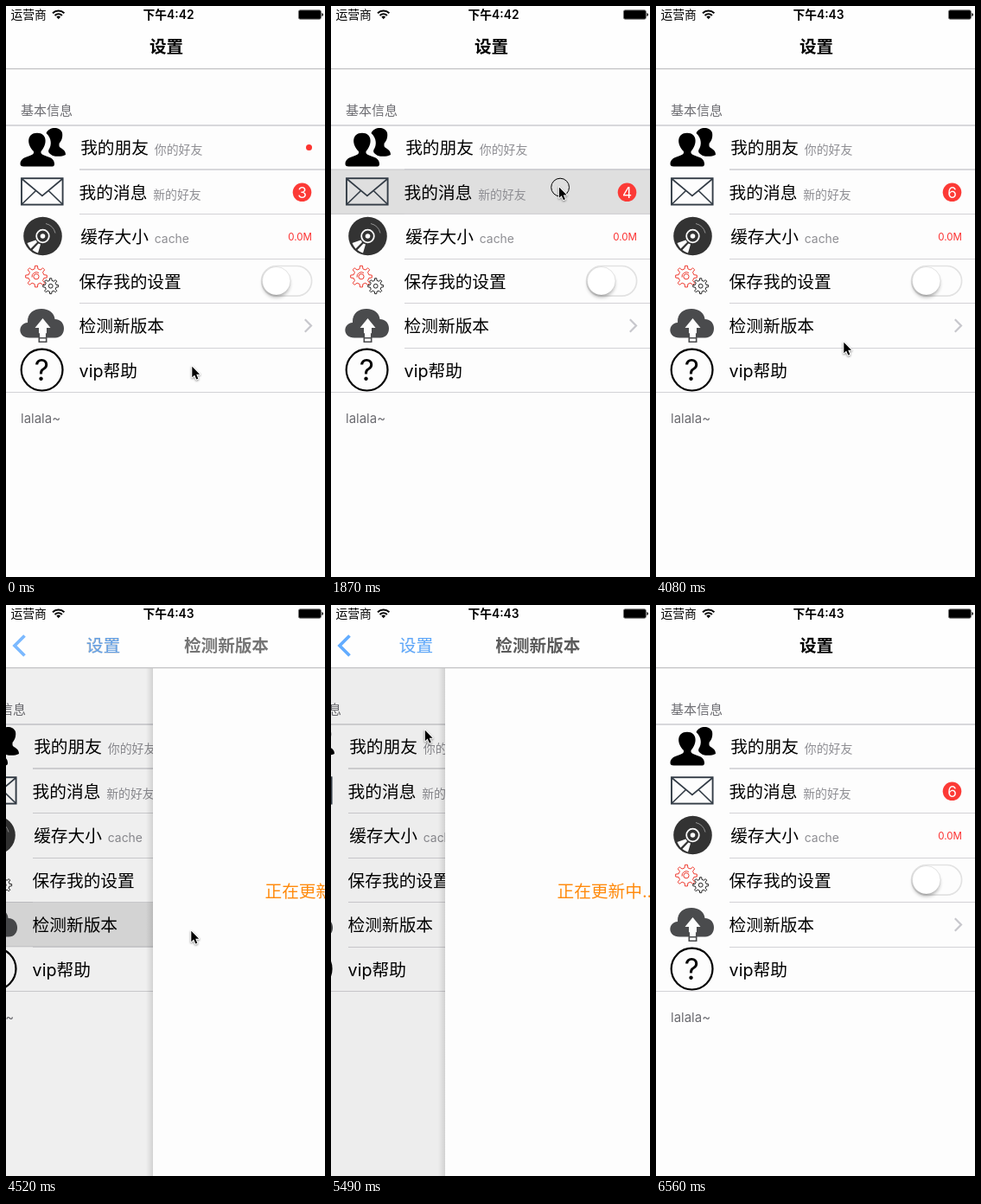
Animation of 369 by 660 pixels, one loop 7.04 s. Source, as an HTML page:

```html
<!DOCTYPE html>
<html lang="zh-CN">
<head>
<meta charset="utf-8">
<title>设置</title>
<style>
html, body { margin: 0; width: 100%; height: 100%; overflow: hidden; background: #fdfdfd; }
svg { display: block; font-family: Inter, "Noto Sans CJK SC", "Noto Sans CJK", sans-serif; }
.label { font-size: 19.7px; }
.detail { font-size: 13.9px; fill: #8e8e93; }
.head { font-size: 15px; fill: #6d6d72; }
.title { font-size: 19.6px; font-weight: 600; text-anchor: middle; }
.status { font-size: 13.8px; }
.mid { text-anchor: middle; }
.line { fill: none; stroke: #d3d2d6; stroke-width: 1; }
.thick { stroke: #cdcdd0; stroke-width: 1.5; }
.none { fill: none; }
#tip { filter: drop-shadow(0 1px .8px rgba(0, 0, 0, .45)); }
</style>
</head>
<body>
<svg width="369" height="660" viewBox="0 0 369 660">
  <defs>
    <filter id="blur" x="-40%" y="-40%" width="180%" height="180%"><feGaussianBlur stdDeviation="2"/></filter>
    <linearGradient id="edge"><stop offset="0" stop-color="#000" stop-opacity="0"/><stop offset="1" stop-color="#000" stop-opacity=".12"/></linearGradient>
  </defs>
  <rect width="369" height="660" fill="#fdfdfd"/>

  <g id="list">
    <rect width="480" height="660" fill="#fdfdfd"/>
    <rect id="glow" x="-1" width="482" height="51.3" fill="#dfdfdf" stroke="#c6c6c9"/>
    <text class="head" x="17" y="126">基本信息</text>
    <text class="head" x="17" y="482">lalala~</text>
    <g id="rows"></g>

    <!-- friends -->
    <path d="M46.500 147C50 139.500 62 139 65 146.500C66 152 64 156 61.500 159V162C63 165.500 69 165 69 172C65 174 59 174.500 54 173C51 171 48 169.500 49.500 166C53 161 53 153 46.500 147Z"/>
    <path d="M32 170V168C23.500 160 24 146.700 36 146.700C48 146.700 48 160 40.500 168V170C43 174.500 56 173 56 182.500C56 185 55 185.500 52 185.500H20.500C17.500 185.500 16.500 184.500 16.500 182.500C17 173 30 174.500 32 170Z"/>
    <!-- envelope -->
    <g class="none" stroke="#343d47" stroke-width="1.9">
      <rect x="18" y="199.200" width="47.600" height="30.400"/>
      <path stroke-width="1.700" d="M18 199.500L41.900 219.500L65.700 199.500M18 229.500L34.500 213.500M65.700 229.500L49.200 213.500"/>
    </g>
    <!-- disc -->
    <circle cx="42.500" cy="266" r="22.300" fill="#333"/>
    <path fill="#fdfdfd" d="M34.500 270.500L24.500 274Q26 277.500 28.500 280.500L36 273ZM37.500 274.500L30.500 282Q33.500 284.500 37 285.500L40 275.500Z"/>
    <path class="none" stroke="#aaa" stroke-width=".8" d="M46 251.500A15 15 0 0 1 57 262.500"/>
    <circle cx="42.500" cy="266" r="7.300" fill="#333" stroke="#fdfdfd" stroke-width="1.800"/>
    <circle cx="42.500" cy="266" r="2.800" fill="#fdfdfd"/>
    <!-- gears -->
    <g class="none" stroke-width="1" stroke-linejoin="round">
      <g stroke="#ef3b30">
        <path id="gearA"/>
        <circle cx="35" cy="312.800" r="3.100"/>
        <path d="M30 313.500A5.200 5.200 0 0 1 38 308.500"/>
      </g>
      <path id="gearB" stroke="#222"/>
      <circle cx="51.700" cy="323.700" r="2.400" stroke="#222"/>
    </g>
    <!-- cloud -->
    <path fill="#4a4b4d" d="M27 383.500C13.500 383.500 13 367 25 366C24.500 354 33 350 41 350C50 350 56 355 56.500 362C70.500 362 70.500 383.500 57 383.500Z"/>
    <path fill="#fdfdfd" d="M42.500 361L51.500 372H47V382H38V372H33.500Z"/>
    <path fill="#fdfdfd" stroke="#4a4b4d" stroke-width="1.600" d="M38.300 379H46.700V388.300H38.300ZM38.300 383.700H46.700"/>
    <path fill="#fdfdfd" d="M39.100 376H45.900V381H39.100Z"/>
    <!-- help -->
    <circle class="none" cx="41.600" cy="420.600" r="23.900" stroke="#000" stroke-width="2.200"/>
    <text class="mid" x="41.300" y="433" font-size="33.500">?</text>

    <circle id="dot" cx="350.500" cy="163.500" r="3.500" fill="#fc3430"/>
    <circle cx="342.500" cy="215.300" r="10.800" fill="#fc3a36"/>
    <text id="count" class="mid" x="342.500" y="221.600" font-size="17.300" fill="#fff"></text>
    <text x="354" y="271" font-size="11.500" fill="#fc2f2f" text-anchor="end">0.0M</text>
    <path class="none" stroke="#c7c7cc" stroke-width="2.200" d="M345.800 362.300L353 369.500L345.800 376.700"/>
    <rect id="track" x="295.600" y="300.500" width="58" height="34.600" rx="17.300" stroke-width="1.700"/>
    <g id="knob">
      <circle cx="312.700" cy="321" r="15.500" opacity=".3" filter="url(#blur)"/>
      <circle cx="312.700" cy="317.800" r="16.300" fill="#fff" stroke="#000" stroke-opacity=".13" stroke-width=".8"/>
    </g>
    <rect id="dim" width="480" height="660"/>
  </g>

  <g id="update">
    <rect x="-8" width="8" height="660" fill="url(#edge)"/>
    <rect width="369" height="660" fill="#fdfdfd"/>
    <text class="label" x="129.500" y="338" fill="#ff8a0c">正在更新中...</text>
  </g>

  <rect width="369" height="72" fill="#fefefe"/>
  <path d="M0 72.700H369" stroke="#c2c2c4" stroke-width="1.200"/>
  <text id="home" class="title" x="185.500" y="54">设置</text>
  <text id="next" class="title" x="185.500" y="54">检测新版本</text>
  <path id="arrow" class="none" stroke="#0a7dff" stroke-width="3.700" d="M21.500 35.500L10 47L21.500 58.500"/>
  <text id="back" class="label" x="30" y="54" fill="#0a7dff">设置</text>

  <text class="status" x="5.500" y="14.800">运营商</text>
  <g class="none" stroke="#000" stroke-width="2">
    <path d="M54 8.200A10 10 0 0 1 67.400 8.200M56.500 10.900A6.300 6.300 0 0 1 64.900 10.900"/>
    <path fill="#000" stroke="none" d="M60.700 15.300L58.300 12.600A3.500 3.500 0 0 1 63.100 12.600Z"/>
  </g>
  <text id="clock" class="status mid" x="188" y="15" font-weight="600"></text>
  <rect x="338.400" y="4.800" width="26" height="10.400" rx="1.800" stroke="#777" stroke-width=".9"/>
  <path d="M365.400 8Q367 8.300 367 10T365.400 12Z"/>

  <g id="pointer">
    <circle id="ring" class="none" cx="1.500" cy="1" r="10.400" stroke="#000" stroke-width="1"/>
    <path id="tip" stroke="#fff" stroke-width="2" stroke-linejoin="round" paint-order="stroke" d="M.3 .8V13.200L3.100 10.600L5.300 15.600L7.300 14.700L5.200 9.800H9.100Z"/>
  </g>
</svg>
<script>
const $ = id => document.getElementById(id);
const LOOP = 7040, STEP = 88.65, LAST = 74;
const TOP = 138, PITCH = 51.45;
const lineY = i => Math.floor(TOP + PITCH * i) + (i > 1 ? .5 : 0);

const rows = [
  ['我的朋友', '你的好友'], ['我的消息', '新的好友'], ['缓存大小', 'cache'],
  ['保存我的设置'], ['检测新版本'], ['vip帮助']
];
$('rows').innerHTML = `<path class="line thick" d="M0 ${TOP}H480"/>` + rows.map(([name, note], i) => {
  const x = i === 0 || i === 2 ? 86.2 : 84.6;
  const base = Math.round(TOP + 33.2 + 51.5 * i);
  return `<text class="label" x="${x}" y="${base}">${name}</text>` +
    (note ? `<text class="detail" x="${x + 85.6}" y="${base}">${note}</text>` : '') +
    `<path class="line ${i ? '' : 'thick'}" d="M${i === 5 ? 0 : 85} ${lineY(i + 1)}H480"/>`;
}).join('');

function gear(cx, cy, r, inner, teeth) {
  let d = '';
  for (let i = 0; i < teeth; i++) {
    [[-.27, inner], [-.15, r], [.15, r], [.27, inner]].forEach(([a, rad]) => {
      const ang = (i + a) * 2 * Math.PI / teeth - Math.PI / 2;
      d += (d ? 'L' : 'M') + (cx + rad * Math.cos(ang)).toFixed(2) + ' ' + (cy + rad * Math.sin(ang)).toFixed(2);
    });
  }
  return d + 'Z';
}
$('gearA').setAttribute('d', gear(35, 312.6, 12.4, 9, 8));
$('gearB').setAttribute('d', gear(51.7, 323.7, 9, 6.5, 8));

// step, x, y
const path = [
  [0, 215, 416], [2, 206, 462], [3, 213, 479], [5, 225, 370], [8, 229, 181],
  [10, 231, 163], [13, 232, 164], [15, 255, 229], [17, 264, 209], [27, 263, 208],
  [30, 280, 270], [32, 293, 313], [34, 315, 318], [41, 316, 319],
  [44, 260, 362], [46, 217, 388], [47, 217, 380], [51, 214, 376], [53, 150, 240],
  [55, 81, 106], [58, 38, 50], [61, 37, 48], [63, 180, 240], [65, 279, 414],
  [68, 284, 470], [71, 288, 570], [73, 291, 636]
];
const presses = [[10, 12], [17, 18], [21, 22], [25, 26], [34, 35], [38, 39], [47, 48], [59, 60]];
// row, first step, last step
const glows = [[0, 10, 12], [1, 17, 19], [1, 21, 23], [1, 25, 27], [4, 47, 58]];

const clamp = v => Math.max(0, Math.min(1, v));
const mix = (a, b, p) => a + (b - a) * p;
const shift = (id, x, y = 0) => $(id).setAttribute('transform', `translate(${x} ${y})`);
const fade = (id, o) => $(id).setAttribute('opacity', o);

function place(k) {
  const i = path.findIndex(p => p[0] > k);
  if (i < 0) return path[path.length - 1].slice(1);
  const a = path[i - 1], b = path[i], p = (k - a[0]) / (b[0] - a[0]);
  return [mix(a[1], b[1], p), mix(a[2], b[2], p)];
}

function spring(n) {
  if (n <= 0) return 0;
  const rest = (1 + 1.8 * n) * Math.exp(-1.8 * n);
  return rest < .001 ? 1 : 1 - rest;
}

function draw(t) {
  const k = Math.min(LAST, Math.floor(t / STEP + .1));

  shift('pointer', ...place(k));
  fade('pointer', k < LAST ? 1 : 0);
  fade('ring', presses.some(([a, b]) => k >= a && k <= b) ? 1 : 0);

  const glow = glows.find(([, a, b]) => k >= a && k <= b + 1);
  fade('glow', glow ? (k > glow[2] ? .4 : 1) : 0);
  if (glow) $('glow').setAttribute('y', lineY(glow[0]));

  fade('dot', k < 12 ? 1 : 0);
  $('count').textContent = 3 + [19, 23, 27].filter(s => k >= s).length;
  $('clock').textContent = k < 28 ? '下午4:42' : '下午4:43';

  const on = clamp((k - 35) / 2) - clamp((k - 39) / 2);
  shift('knob', 23 * on);
  $('track').setAttribute('fill', on > 0 ? `rgba(76,217,100,${on})` : '#fdfdfd');
  $('track').setAttribute('stroke', `rgb(${mix(226, 76, on)},${mix(226, 217, on)},${mix(226, 100, on)})`);

  const p = k < 60 ? spring(k - 50) : 1 - spring(k - 61.3);
  const q = p < .02 ? 0 : p;
  shift('list', Math.floor(-100 * p));
  fade('dim', .1 * q);
  shift('update', q ? Math.floor(369 * (1 - q)) : 400);
  shift('home', -136 * q);
  fade('home', clamp(1 - 1.5 * q));
  shift('back', 136 * (1 - q));
  fade('back', q);
  fade('arrow', q);
  shift('next', 150 * (1 - q));
  fade('next', q);
}

const start = performance.now();
function tick() {
  draw((performance.now() - start) % LOOP);
  requestAnimationFrame(tick);
}
tick();
</script>
</body>
</html>
```
